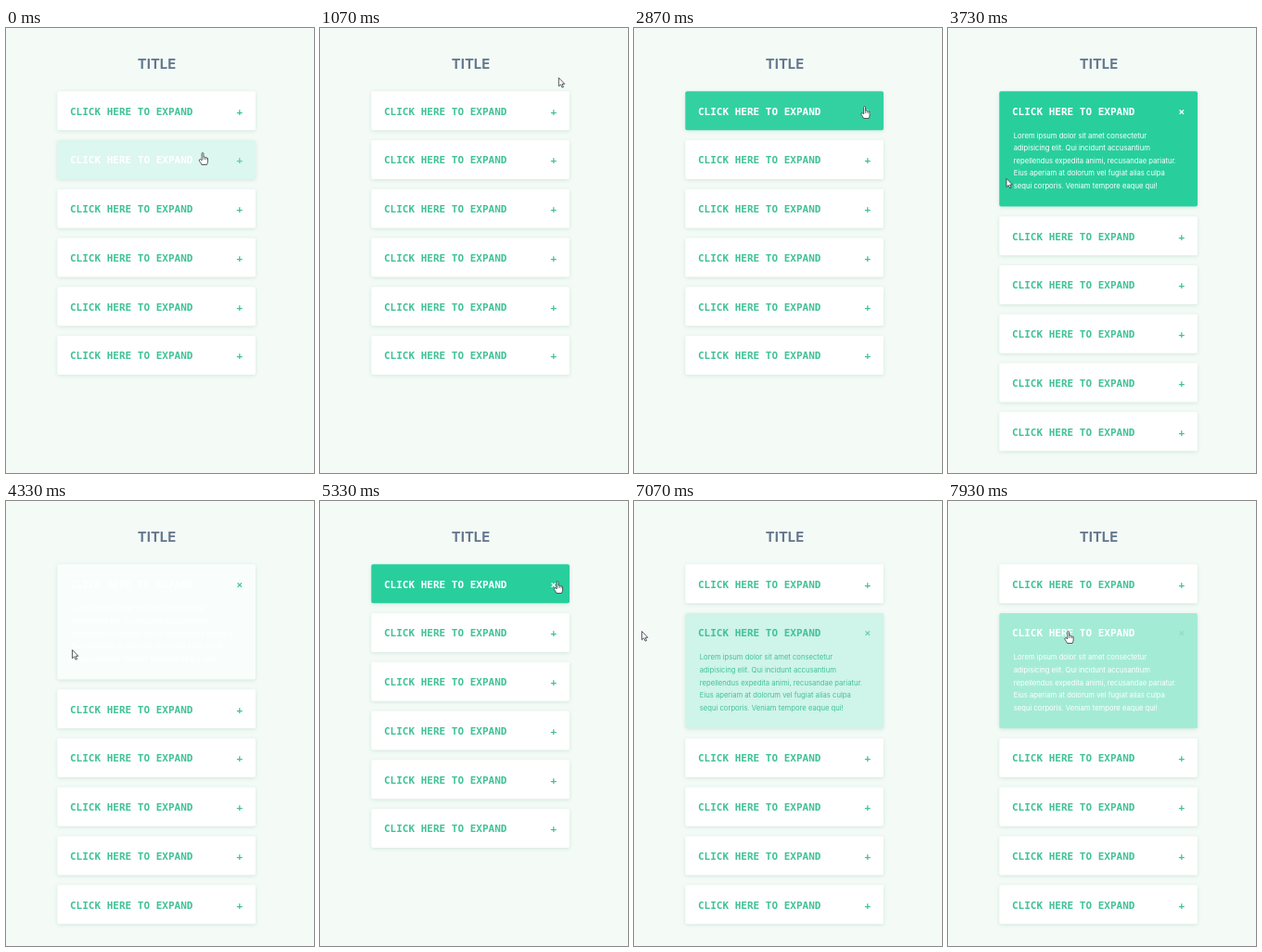
An HTML page that plays this animation: 332 px wide and 480 px high, repeating every 8 s.

```html
<!DOCTYPE html>
<html lang="en">
<head>
<meta charset="utf-8">
<title>Accordion</title>
<style>
  html, body { margin: 0; width: 100%; height: 100%; overflow: hidden; background: #f4fbf7; }
  svg { display: block; width: 332px; height: 480px; }
  .title { font: 700 14.8px Inter, sans-serif; fill: #64788e; text-anchor: middle; }
  .box { filter: drop-shadow(0 1px 2px rgba(30, 120, 90, .16)); }
  .label { font: 700 11px "DejaVu Sans Mono", monospace; white-space: pre; }
  .body { font: 400 7.65px Inter, sans-serif; }
</style>
</head>
<body>
<svg id="stage" viewBox="0 0 332 480">
  <rect width="332" height="480" fill="#f4fbf7"/>
  <text class="title" x="162.5" y="43.6">TITLE</text>
</svg>
<script>
const LOOP = 8000, STEP = 1000 / 15, LEAD = 42, FADE = 300, SLIDE = 400;
const LEFT = 55.3, TOP = 68.3, WIDTH = 213.7, HEIGHT = 42, PITCH = 52.75, EXTRA = 82.3;
const GREEN = [40, 207, 157], TEXT = [64, 194, 152], WHITE = [255, 255, 255];
const LINES = [
  'Lorem ipsum dolor sit amet consectetur',
  'adipisicing elit. Qui incidunt accusantium',
  'repellendus expedita animi, recusandae pariatur.',
  'Eius aperiam at dolorum vel fugiat alias culpa',
  'sequi corporis. Veniam tempore eaque qui!'
];

// Pointer moves: start, duration, goal
const HOME = [212, 134];
const MOVES = [
  [100, 400, 291, 100], [500, 350, 260, 53], [1000, 500, 205, 54], [1580, 200, 188, 137],
  [1900, 200, 215, 168], [2163, 800, 250, 80.5], [3380, 500, 14, 183], [4251, 260, 256, 86],
  [5480, 450, 150, 178], [6136, 213, 136.5, 124], [6700, 380, 8, 140], [7775, 200, 145, 140]
];
const CLICKS = [{ card: 0, open: 2960, close: 4930 }, { card: 1, open: 6450, close: Infinity }];

const clamp = v => Math.min(1, Math.max(0, v));
const smooth = v => { v = clamp(v); return v * v * (3 - 2 * v); };
const mix = (a, b, p) => `rgb(${a.map((v, i) => Math.round(v + (b[i] - v) * p))})`;

function bezier(x1, y1, x2, y2) {
  const at = (a, b, s) => 3 * a * s * (1 - s) ** 2 + 3 * b * s * s * (1 - s) + s ** 3;
  return x => {
    if (x <= 0 || x >= 1) return clamp(x);
    let lo = 0, hi = 1;
    for (let i = 0; i < 20; i++) {
      const mid = (lo + hi) / 2;
      if (at(x1, x2, mid) < x) lo = mid; else hi = mid;
    }
    return at(y1, y2, lo);
  };
}
const ease = bezier(.25, .1, .25, 1);
const easeOut = bezier(0, 0, .58, 1);

function pointer(t) {
  let [x, y] = HOME;
  for (const [start, length, toX, toY] of MOVES) {
    const p = smooth((t - start) / length);
    x += (toX - x) * p;
    y += (toY - y) * p;
  }
  return [x, y];
}

function layout(t) {
  let top = TOP;
  return Array.from({ length: 6 }, (_, card) => {
    const click = CLICKS.find(c => c.card === card && t >= c.open);
    const amount = click ? easeOut((t - click.open) / SLIDE) * (1 - easeOut((t - click.close) / SLIDE)) : 0;
    const open = !!click && t < click.close + SLIDE + 10;
    const item = { top, amount, open, height: HEIGHT + EXTRA * amount };
    top += PITCH + EXTRA * amount;
    return item;
  });
}

// Follow the pointer once to learn when it enters and leaves each card
const hovers = [];
for (let t = -LEAD, last; t < LOOP; t += 2) {
  const [x, y] = pointer(t);
  const inside = x >= LEFT && x <= LEFT + WIDTH;
  const card = inside ? layout(t).findIndex(c => y >= c.top && y <= c.top + c.height) : -1;
  if (last && last.card === card) last.to = t + 2;
  else hovers.push(last = { card, from: t, to: t + 2 });
}
const isHovered = (card, t) => hovers.some(h => h.card === card && t >= h.from && t < h.to);
function tint(card, t) {
  const levels = hovers.filter(h => h.card === card && t >= h.from).map(h =>
    ease((Math.min(t, h.to) - h.from) / FADE) * (1 - ease((t - h.to) / FADE)));
  return Math.max(0, ...levels);
}

const stage = document.getElementById('stage');
function set(el, attrs) {
  for (const k in attrs) el.setAttribute(k, attrs[k]);
}
function add(parent, tag, attrs, text) {
  const el = document.createElementNS('http://www.w3.org/2000/svg', tag);
  set(el, attrs);
  if (text) el.textContent = text;
  return parent.appendChild(el);
}

const cards = Array.from({ length: 6 }, (_, i) => {
  const g = add(stage, 'g', {});
  const box = add(g, 'rect', { class: 'box', width: WIDTH, rx: 2 });
  const label = add(g, 'text', { class: 'label', x: 13.7, y: 25.4 }, 'CLICK HERE TO EXPAND');
  const sign = add(g, 'text', { class: 'label', x: 193.2, y: 25.4 });
  const clip = add(add(g, 'clipPath', { id: 'clip' + i }), 'rect', { width: WIDTH });
  const body = add(g, 'g', { class: 'body', 'clip-path': `url(#clip${i})` });
  LINES.forEach((line, n) => add(body, 'text', { x: 15.5, y: 50.3 + n * 13.6 }, line));
  return { g, box, label, sign, clip, body };
});

const ink = { fill: '#fff', stroke: '#333c40', 'stroke-width': .9, 'stroke-linejoin': 'round' };
const arrow = add(stage, 'path', { ...ink, d: 'M0 0V10L2.4 7.9L4 11.5L5.6 10.8L4 7.3H7Z' });
const hand = add(stage, 'g', ink);
add(hand, 'path', { d: 'M-1 8V1Q-1 0 0 0T1 1V5Q2 4.2 2.8 5.4Q4 4.8 4.5 6Q6 5.6 6 7V10Q6 12 4.8 14H-1.2Q-2 12 -4 9.4Q-4.4 7.8 -3 7.6Q-2 7.6 -1 9Z' });
add(hand, 'path', { d: 'M1 5V8M2.8 5.4V8M4.5 6V8.4', 'stroke-width': .6 });

function render(t) {
  const [x, y] = pointer(t);
  let overLabel = false;
  layout(t).forEach(({ top, amount, open, height }, i) => {
    const c = cards[i], p = tint(i, t), hot = isHovered(i, t);
    const fill = mix(TEXT, WHITE, hot ? 1 : 0);
    set(c.g, { transform: `translate(${LEFT} ${top})` });
    set(c.box, { height, fill: mix(WHITE, GREEN, p) });
    set(c.label, { fill });
    set(c.sign, { fill: mix(TEXT, WHITE, p) });
    c.sign.textContent = open ? '×' : '+';
    set(c.clip, { height });
    set(c.body, { fill, visibility: amount > 0 ? 'visible' : 'hidden' });
    if (hot && y < top + HEIGHT) overLabel = true;
  });
  const transform = `translate(${x} ${y + .6}) scale(.92)`;
  set(hand, { transform, visibility: overLabel ? 'visible' : 'hidden' });
  set(arrow, { transform, visibility: overLabel ? 'hidden' : 'visible' });
}

const start = performance.now();
function tick() {
  const t = (performance.now() - start) % LOOP;
  render(Math.floor((t + 4) / STEP) * STEP % LOOP);
  requestAnimationFrame(tick);
}
tick();
</script>
</body>
</html>
```
